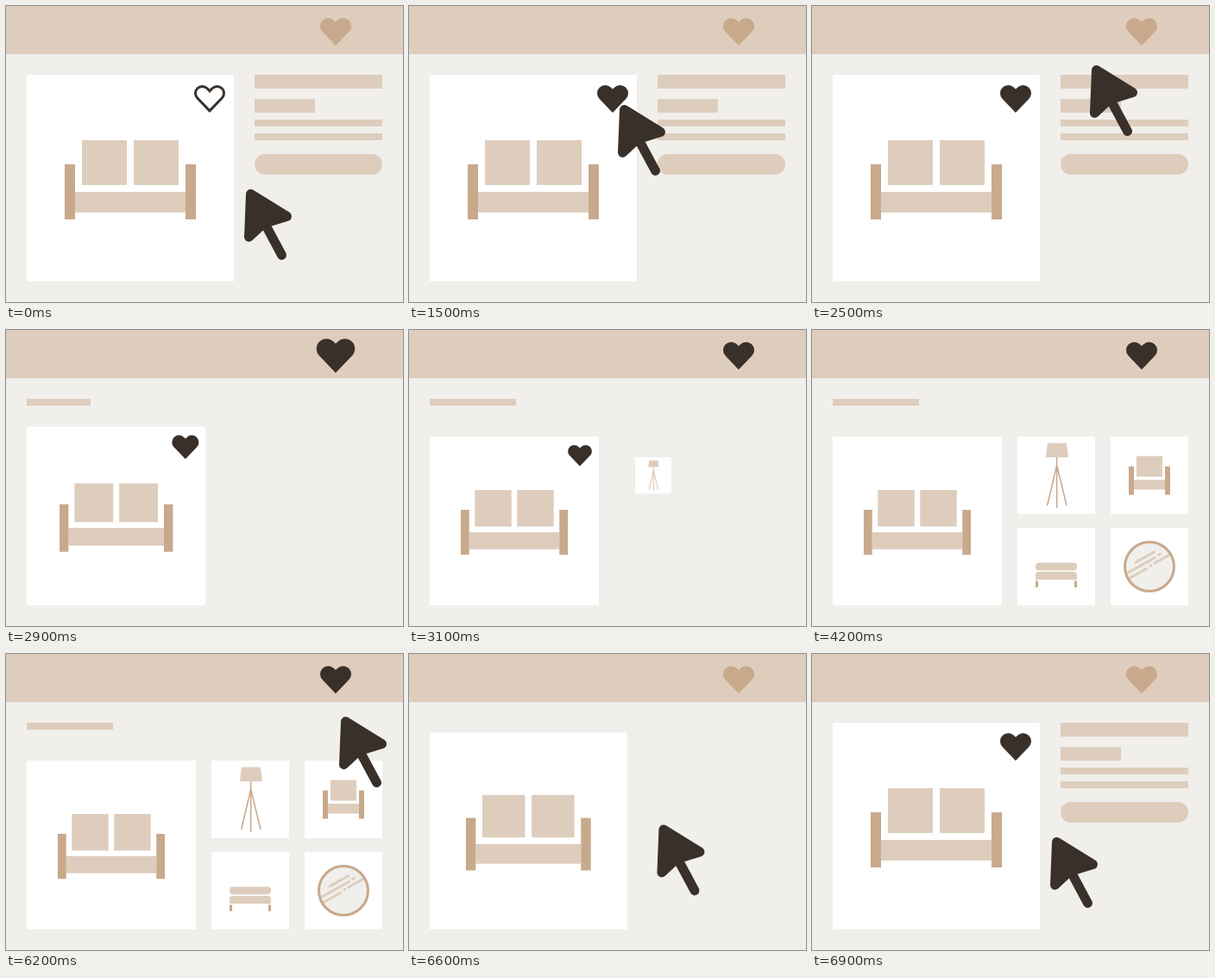
An HTML page for the animation above (8900 ms loop, 460 px wide and 344 px high).

```html
<!DOCTYPE html>
<html lang="en">
<head>
<meta charset="utf-8">
<title>Wishlist</title>
<style>
  html, body { margin: 0; height: 100%; overflow: hidden; background: #f0efeb; }
  svg { display: block; width: 100vw; height: 100vh; }
  .sand { fill: #decdbd; }
  .wood { fill: #c8a98c; }
  .white { fill: #fff; }
  .heart { stroke-width: 3; }
  .line { fill: none; stroke: #c8a98c; stroke-width: 1.5; }
  #cursor { fill: #3a302a; stroke: #3a302a; stroke-width: 11; stroke-linejoin: round; stroke-linecap: round; }
</style>
</head>
<body>
<svg viewBox="0 0 460 344">
  <defs>
    <path id="heart" d="M0 13.9L-14.2 -1A7.9 7.9 0 0 1 -3 -12.2L0 -9.2L3 -12.2A7.9 7.9 0 0 1 14.2 -1Z"/>
    <clipPath id="glass"><circle cx="391" cy="275" r="28.5"/></clipPath>
  </defs>

  <rect class="sand" width="460" height="56"/>
  <use id="saved" class="heart" href="#heart"/>
  <rect id="title" class="sand" x="24" y="80" height="8"/>

  <g id="details" class="sand">
    <rect x="288" y="80" width="148" height="16"/>
    <rect x="288" y="108" width="70" height="16"/>
    <rect x="288" y="132" width="148" height="8"/>
    <rect x="288" y="148" width="148" height="8"/>
    <rect x="288" y="172" width="148" height="24" rx="12"/>
  </g>

  <g id="sofa">
    <rect class="white" width="240" height="240"/>
    <path class="sand" d="M64 76h52v52h-52zM124 76h52v52h-52zM56 136h128v24h-128z"/>
    <path class="wood" d="M44 104h12v64h-12zM184 104h12v64h-12z"/>
  </g>
  <use id="like" class="heart" href="#heart"/>

  <g class="card">
    <rect class="white" x="238" y="124" width="90" height="90"/>
    <path class="line" d="M283.7 148V207M283.7 157L272.6 204M283.7 157L295 204"/>
    <path class="sand" d="M272.8 131.5H295L297 148H271Z"/>
  </g>
  <g class="card">
    <rect class="white" x="346" y="124" width="90" height="90"/>
    <path class="sand" d="M376 146.5h30v24h-30zM373 174h36v11.5h-36z"/>
    <path class="wood" d="M367 158.5h6v33h-6zM409 158.5h6v33h-6z"/>
  </g>
  <g class="card">
    <rect class="white" x="238" y="230" width="90" height="90"/>
    <rect class="sand" x="259" y="270.5" width="48" height="9" rx="4"/>
    <path class="sand" d="M259 290.3V285a4 4 0 0 1 4 -4h40a4 4 0 0 1 4 4v5.3z"/>
    <path class="wood" d="M259 291.5h3v7.5h-3zM304 291.5h3v7.5h-3z"/>
  </g>
  <g class="card">
    <rect class="white" x="346" y="230" width="90" height="90"/>
    <circle cx="391" cy="275" r="28.5" fill="#f0efeb"/>
    <path clip-path="url(#glass)" fill="none" stroke="#decdbd" stroke-width="3" stroke-linecap="round"
      d="M375 270L396.5 258M401.5 261.5L403.5 260.4M362 284.5L397.5 264.5M362 292L387.5 277.5M392 274L392.6 273.7M397 271L420 258"/>
    <circle cx="391" cy="275" r="28.5" fill="none" stroke="#c8a98c" stroke-width="3"/>
  </g>

  <path id="cursor" d="M5.5 5.5L47.5 31.5L20 40L3.5 55.5ZM22 40L41.5 76.5"/>
</svg>
<script>
const LOOP = 8900, STEP = 100;
const DARK = '#3a302a', WOOD = '#c8a98c';
const $ = id => document.getElementById(id);
const cards = [...document.querySelectorAll('.card')];
const centers = [[283, 169], [391, 169], [283, 275], [391, 275]];

const prog = (t, a, b) => Math.min(1, Math.max(0, (t - a) / (b - a)));
const ease = u => u * u * (3 - 2 * u);
const move = (t, a, b) => ease(prog(t, a, b));
const lerp = (a, b, u) => a + (b - a) * u;
const pulse = (t, a, b) => 1 + Math.sin(Math.PI * prog(t, a, b)) / 3;

// Point on a quadratic curve
const quad = (p, c, q, u) => p.map((v, i) => lerp(lerp(v, c[i], u), lerp(c[i], q[i], u), u));

function place(el, x, y, s = 1) {
  el.setAttribute('transform', `translate(${x} ${y}) scale(${s})`);
  el.style.display = s > 0.001 ? '' : 'none';
}

function paint(el, fill, stroke = fill) {
  el.setAttribute('fill', fill);
  el.setAttribute('stroke', stroke);
}

const rest = [278, 213], onLike = [244, 115], onSaved = [388, 73];
function cursorAt(t) {
  if (t < 2400) return quad(rest, [261, 164], onLike, move(t, 900, 1200));
  if (t < 6200) return quad(onLike, [332, 44], onSaved, move(t, 2400, 2600));
  return quad(onSaved, [333, 143], rest, move(t, 6200, 6700));
}

function draw(t) {
  // Header heart
  place($('saved'), 382, 30, pulse(t, 1100, 1500) * pulse(t, 2600, 3000));
  paint($('saved'), t >= 2600 && t < 6400 ? DARK : WOOD);

  // Product page <-> list
  const small = move(t, 2700, 3000) - move(t, 6400, 6700);
  const size = lerp(1, 196 / 240, small);
  place($('sofa'), 24, 320 - 240 * size, size);
  $('title').setAttribute('width', 100 * (move(t, 2700, 3000) - move(t, 6300, 6500)));

  const open = 1 - move(t, 2600, 2800) + move(t, 6600, 6900);
  $('details').setAttribute('transform', `translate(${288 * (1 - open)} 0) scale(${open} 1)`);
  $('details').style.display = open > 0.001 ? '' : 'none';

  // Heart on the product
  const shown = 1 - prog(t, 3030, 3320) ** 2 + move(t, 6600, 6900);
  place($('like'), 236 - 38 * small, 108 + 38 * small, size * shown * pulse(t, 1100, 1500));
  paint($('like'), t < 1200 ? '#fff' : DARK, DARK);

  // List cards pop in one after another
  cards.forEach((card, i) => {
    const start = 3000 + 300 * i;
    const s = 1 - (1 - prog(t, start, start + 300)) ** 1.55 - move(t, 6200, 6500);
    const [x, y] = centers[i];
    place(card, x * (1 - s), y * (1 - s), s);
  });

  place($('cursor'), ...cursorAt(t), t >= 2900 && t < 6200 ? 0 : 1);
}

const t0 = performance.now();
function tick() {
  const t = performance.now() - t0 + 20;
  draw(Math.floor(t / STEP) * STEP % LOOP);
  requestAnimationFrame(tick);
}
tick();
</script>
</body>
</html>
```
